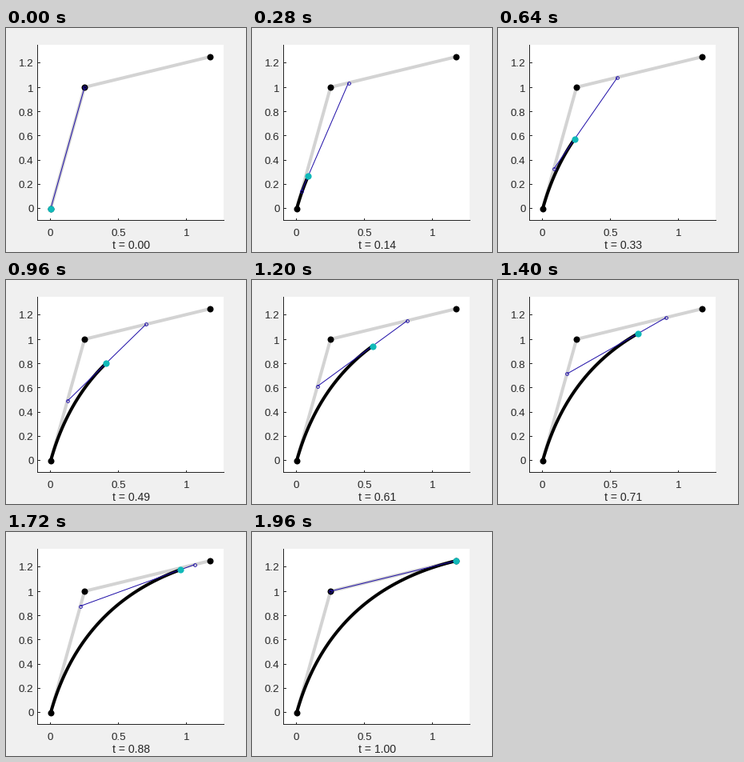
Write a matplotlib script that moves like this. It is 300x280 px and loops after 2000 ms.

```python
import numpy as np
import matplotlib.pyplot as plt
from matplotlib.animation import FuncAnimation
from matplotlib.patches import Rectangle

W, H, DPI = 300, 280, 80
PX = 72 / DPI  # points per pixel
FRAMES, INTERVAL = 50, 40

INK, GRAY, BLUE, CYAN = "#262626", "#d3d3d3", "#2010a8", "#10b9b9"
LEFT, RIGHT, TOP, BOTTOM = 39, 272, 21, 240

plt.rcParams["font.family"] = "Liberation Sans"
fig = plt.figure(figsize=(W / DPI, H / DPI), dpi=DPI, facecolor="#f0f0f0")
ax = fig.add_axes([0, 0, 1, 1])
ax.set_xlim(0, W)
ax.set_ylim(H, 0)
ax.axis("off")


def to_px(x, y):
    return np.array([55.9 + 169.1 * x, 225.8 - 151.8 * y])


def line(xs, ys, color, width, **kw):
    return ax.plot(xs, ys, color=color, lw=width * PX,
                   solid_capstyle="butt", **kw)[0]


def dots(color, size):
    return ax.plot([], [], "o", color=color, ms=size * PX, mew=0, snap=False)[0]


def label(x, y, text, size, ha="center"):
    return ax.text(x, y, text, color=INK, fontsize=size * PX, ha=ha, va="baseline")


# Plot area, axis lines and inward ticks
ax.add_patch(Rectangle((LEFT, TOP), RIGHT - LEFT, BOTTOM - TOP, fc="white", lw=0))
line([LEFT, LEFT, RIGHT], [TOP, BOTTOM, BOTTOM], INK, 1, antialiased=False)
for v in (0, 0.5, 1):
    x = int(to_px(v, 0)[0])
    line([x, x], [BOTTOM, BOTTOM - 2], INK, 1, antialiased=False)
    label(x + 0.5, 259.5, f"{v:g}", 13.33)
for v in np.arange(7) * 0.2:
    y = int(to_px(0, v)[1])
    line([LEFT, LEFT + 3], [y, y], INK, 1, antialiased=False)
    label(34.5, y + 5.5, f"{v:g}", 13.33, ha="right")

p0, p1, p2 = to_px(0, 0), to_px(0.25, 1), to_px(1.177, 1.25)
controls = np.array([p0, p1, p2])


def bezier(t):
    t = np.asarray(t)[..., None]
    return (1 - t) ** 2 * p0 + 2 * t * (1 - t) * p1 + t**2 * p2


line(*controls.T, GRAY, 4, solid_joinstyle="round")
dots("black", 8).set_data(*controls.T)
curve = line([], [], "black", 4, solid_joinstyle="round")
chord = line([], [], BLUE, 1, marker="o", ms=3.8 * PX, mfc="none",
             mec=BLUE, mew=0.9 * PX, snap=False)
tip = dots(CYAN, 8.2)
caption = label(156.8, 276.5, "", 14)


def update(i):
    t = i / (FRAMES - 1)
    curve.set_data(*bezier(np.arange(i + 1) / (FRAMES - 1)).T)
    a, b = p0 + t * (p1 - p0), p1 + t * (p2 - p1)
    chord.set_data(*np.array([a, b]).T)
    tip.set_data(*bezier([t]).T)
    caption.set_text(f"t = {t:.2f}")
    return curve, chord, tip, caption


anim = FuncAnimation(fig, update, frames=FRAMES, interval=INTERVAL,
                     repeat=True, repeat_delay=0)
plt.show()
```
